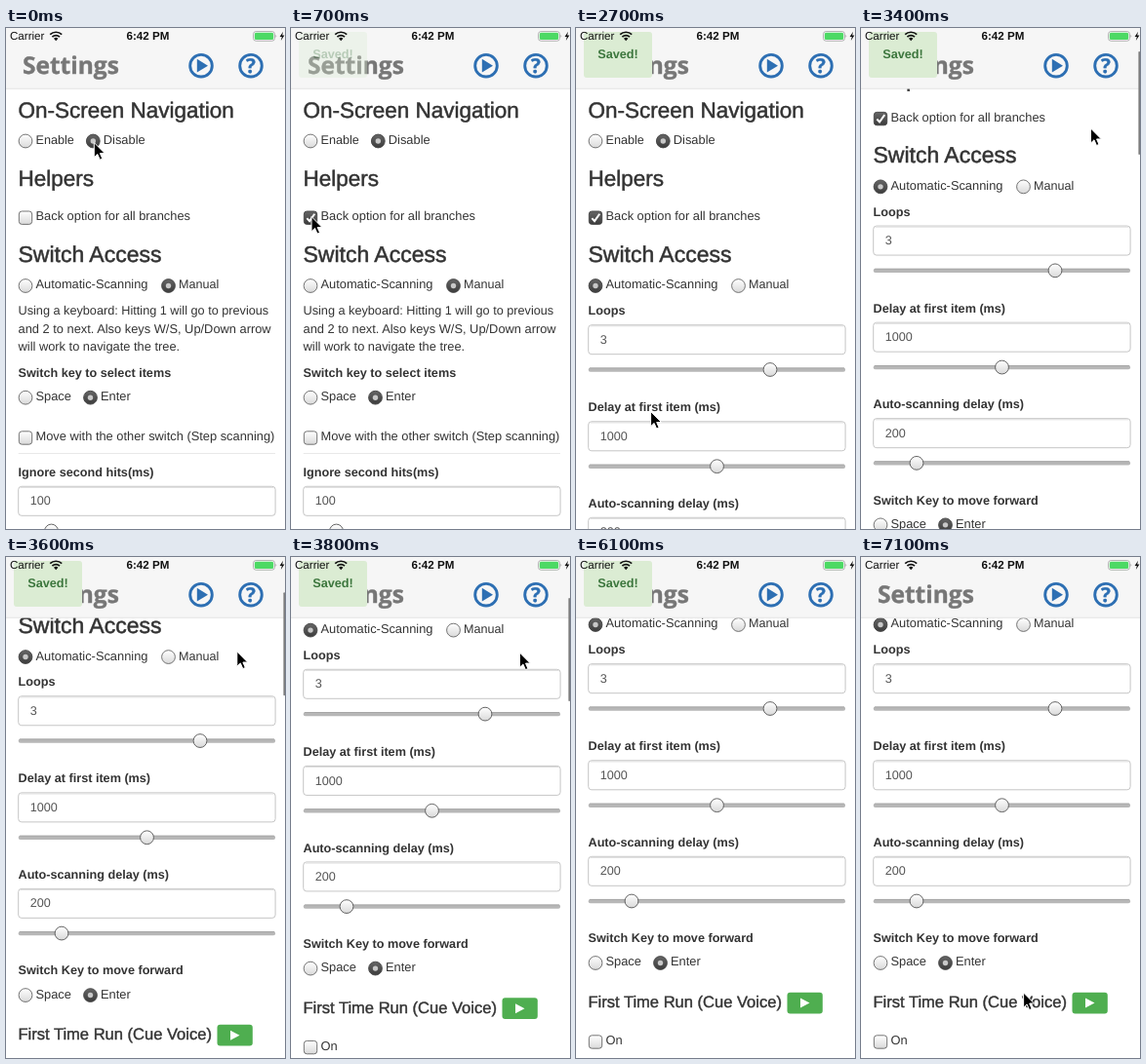
Animation of 286 by 514 pixels, one loop 7200 ms. Source, as an HTML page:

```html
<!DOCTYPE html>
<html lang="en">
<head>
<meta charset="utf-8">
<title>Settings</title>
<style>
html, body { margin: 0; width: 100%; height: 100%; overflow: hidden; background: #fff; }
svg { display: block; width: 286px; height: 514px; font-family: "Liberation Sans", Arial, sans-serif; }
text { fill: #333; font-size: 12.85px; white-space: pre; text-rendering: geometricPrecision; }
#page text { transform: translateY(-.6px); }
.h { font-size: 22.5px; stroke: #333; stroke-width: .5px; }
.h4 { font-size: 16.55px; stroke: #333; stroke-width: .4px; }
.b { font-size: 12.65px; font-weight: bold; }
.in { font-size: 12.6px; fill: #555; }
.st { font-size: 11.6px; fill: #111; }
.title { font: bold 24.5px "Open Sans", sans-serif; fill: #777; stroke: #777; stroke-width: .4px; }
.help { font: bold 20.5px "Open Sans", sans-serif; fill: #2d6fb3; stroke: #2d6fb3; stroke-width: .4px; text-anchor: middle; }
</style>
</head>
<body>
<svg viewBox="0 0 286 514">
  <defs>
    <linearGradient id="light" x2="0" y2="1"><stop stop-color="#fff"/><stop offset="1" stop-color="#d9d9d9"/></linearGradient>
    <linearGradient id="dark" x2="0" y2="1"><stop stop-color="#666"/><stop offset="1" stop-color="#3c3c3c"/></linearGradient>
  </defs>
  <g id="page">
    <g id="common"></g>
    <g id="manual"></g>
    <g id="auto"></g>
  </g>
  <rect width="286" height="62" fill="#f6f6f6"/>
  <path d="M0 62.3H286" stroke="#dcdcdc" stroke-width=".8"/>
  <text class="title" x="17" y="46.7">Settings</text>
  <g fill="none" stroke="#2d6fb3" stroke-width="2.9">
    <circle cx="200" cy="38.7" r="11.3"/>
    <circle cx="251" cy="38.7" r="11.3"/>
  </g>
  <path d="M195.8 31.8V45.6L207 38.7Z" fill="#2d6fb3"/>
  <text class="help" x="251" y="46">?</text>
  <g id="toast">
    <rect x="8" y="4" width="70" height="47" rx="3" fill="#dbecd3"/>
    <text class="b" x="22.2" y="31.4" style="fill:#3c763d;font-size:12.7px">Saved!</text>
  </g>
  <text class="st" x="4" y="12">Carrier</text>
  <text class="st" x="123.5" y="12" font-weight="bold">6:42 PM</text>
  <path d="M45.2 6.7A8.6 8.6 0 0 1 57.2 6.7M47.4 9.2A5.4 5.4 0 0 1 55 9.2" fill="none" stroke="#111" stroke-width="1.7"/>
  <path d="M49 10.8A3.2 3.2 0 0 1 53.4 10.8L51.2 13.2Z" fill="#111"/>
  <rect x="253.6" y="3.6" width="21.8" height="9.6" rx="2.6" fill="#fff" stroke="#999" stroke-width=".8"/>
  <rect x="254.8" y="4.8" width="19.4" height="7.2" rx="1.6" fill="#4cd964"/>
  <path d="M276.5 6.8Q278.2 8.4 276.5 10Z" fill="#999"/>
  <path d="M284 3.8L280.6 9H282.8L281.8 13L285.4 7.6H283.2Z" fill="#111"/>
  <rect id="bar" x="284.4" width="1.6" height="106" rx=".8" fill="#7d7d7d"/>
  <path id="cursor" d="M0 0V15.2L3.5 11.9L6 17.6L8.5 16.5L6.1 11H10.9Z" fill="#000" stroke="#fff" stroke-width="1" stroke-linejoin="round"/>
</svg>
<script>
const $ = id => document.getElementById(id);

const text = (x, y, s, cls = "", size = 0) =>
  `<text x="${x}" y="${y}" class="${cls}"${size ? ` style="font-size:${size}px"` : ""}>${s}</text>`;
const dial = (x, y, on) =>
  `<circle cx="${x}" cy="${y}" r="6.9" fill="url(#${on ? "dark" : "light"})" stroke="${on ? "#444" : "#666"}" stroke-width=".9"/>` +
  (on ? `<circle cx="${x}" cy="${y}" r="2.7" fill="#c8c8c8"/>` : "");
const radio = (x, y, label, on, size) => dial(x, y, on) + text(x + 10.5, y + 3.6, label, "", size);
const check = (y, label, on) =>
  `<rect x="13.3" y="${y - 6.5}" width="13.4" height="13.4" rx="3" fill="url(#${on ? "dark" : "light"})" stroke="${on ? "#444" : "#666"}" stroke-width=".9"/>` +
  (on ? `<path d="M16.3 ${y + .6}L19 ${y + 3.6}L24.2 ${y - 3.8}" fill="none" stroke="#fff" stroke-width="2"/>` : "") +
  text(30.5, y + 3.6, label);
const field = (y, value) =>
  `<rect x="12.7" y="${y}" width="263.4" height="30" rx="3.2" fill="#fff" stroke="#c0c0c0" stroke-width=".9"/>` +
  `<path d="M14.5 ${y + 1.1}H274.5" stroke="#dedede"/>` + text(24.7, y + 19.7, value, "in");
const slider = (x, y) =>
  `<rect x="12.7" y="${y - 2}" width="263.4" height="4.2" rx="2" fill="#b7b7b7"/>` +
  `<path d="M14 ${y - 1.6}H275" stroke="#a2a2a2" stroke-width=".8"/>` +
  `<circle cx="${x}" cy="${y}" r="6.9" fill="url(#light)" stroke="#555" stroke-width=".9"/>`;

const common = (boxOn, autoOn) =>
  text(12.5, 92.3, "On-Screen Navigation", "h") +
  radio(20, 116, "Enable", false, 12.6) + radio(89.3, 116, "Disable", true) +
  text(12.5, 162.3, "Helpers", "h") +
  check(194.5, "Back option for all branches", boxOn) +
  text(12.5, 240.3, "Switch Access", "h", 23) +
  radio(20, 264.5, "Automatic-Scanning", autoOn) + radio(166.5, 264.5, "Manual", !autoOn, 12.6);

$("manual").innerHTML =
  text(12.5, 295, "Using a keyboard: Hitting 1 will go to previous", "", 12.7) +
  text(12.5, 313.2, "and 2 to next. Also keys W/S, Up/Down arrow") +
  text(12.5, 331.4, "will work to navigate the tree.") +
  text(12.5, 358.5, "Switch key to select items", "b") +
  radio(20, 379.2, "Space", false) + radio(86.5, 379.2, "Enter", true) +
  check(420.3, "Move with the other switch (Step scanning)", false) +
  `<path d="M12.7 436.5H276" stroke="#e8e8e8"/>` +
  text(12.5, 460.3, "Ignore second hits(ms)", "b") +
  field(470.3, "100") + slider(46.5, 516);

$("auto").innerHTML =
  text(12.5, 295, "Loops", "b") + field(304.7, "3") + slider(199, 350.5) +
  text(12.5, 394, "Delay at first item (ms)", "b") + field(403.8, "1000") + slider(144.5, 449.7) +
  text(12.5, 492.5, "Auto-scanning delay (ms)", "b") + field(502.3, "200") + slider(57, 548) +
  text(12.5, 590.8, "Switch Key to move forward", "b") +
  radio(20, 611.5, "Space", false) + radio(86.5, 611.5, "Enter", true) +
  text(12.5, 657.5, "First Time Run (Cue Voice)", "h4") +
  `<rect x="216.5" y="641.7" width="36.3" height="21.8" rx="3" fill="#4fae50"/>` +
  `<path d="M230 647.6V657.6L239.5 652.6Z" fill="#fff"/>` +
  check(692.3, "On", false);

const LOOP = 7200, STEP = 100;
const CHECKED = 700, SWITCHED = 1900;
// time, x, y of the pointer tip
const path = [
  [0, 90.3, 117.6], [500, 22, 193], [900, 20, 194], [1400, 79.2, 236.4], [1600, 22, 263], [2000, 20, 263],
  [2400, 60, 370], [2700, 76.6, 393.5], [2900, 90, 390], [3300, 235, 105], [3600, 236.8, 97],
  [4100, 230, 100], [4600, 214.6, 107], [4800, 208, 434], [5000, 205, 530], [6400, 180, 530],
  [6700, 170, 455], [7100, 166.6, 447]
];

const ramp = (t, a, b) => Math.min(1, Math.max(0, (t - a) / (b - a)));
const smooth = p => p * p * (3 - 2 * p);

function pointer(t) {
  const i = path.findIndex(p => p[0] > t);
  if (i < 0) return path[path.length - 1].slice(1);
  const [t0, x0, y0] = path[i - 1], [t1, x1, y1] = path[i];
  const k = smooth(ramp(t, t0, t1));
  return [x0 + (x1 - x0) * k, y0 + (y1 - y0) * k];
}

let state = "";
function draw(t) {
  const boxOn = t >= CHECKED, autoOn = t >= SWITCHED;
  if (state !== `${boxOn}${autoOn}`) {
    state = `${boxOn}${autoOn}`;
    $("common").innerHTML = common(boxOn, autoOn);
    $("manual").style.display = autoOn ? "none" : "";
    $("auto").style.display = autoOn ? "" : "none";
  }
  const scroll = 195 * (1 - Math.pow(1 - ramp(t, 3200, 4000), 2.56));
  $("page").setAttribute("transform", `translate(0 ${-scroll})`);
  $("bar").setAttribute("y", 3 + scroll * .206);
  $("bar").setAttribute("opacity", ramp(t, 3200, 3300) * (1 - ramp(t, 4100, 4400)));
  $("toast").setAttribute("opacity", ramp(t, 600, 900) * (1 - ramp(t, 6500, 6900)));
  $("cursor").setAttribute("transform", `translate(${pointer(t)})`);
}

const start = performance.now();
function tick() {
  const t = (performance.now() - start) % LOOP;
  draw(Math.floor(t / STEP) * STEP);
  requestAnimationFrame(tick);
}
tick();
</script>
</body>
</html>
```
